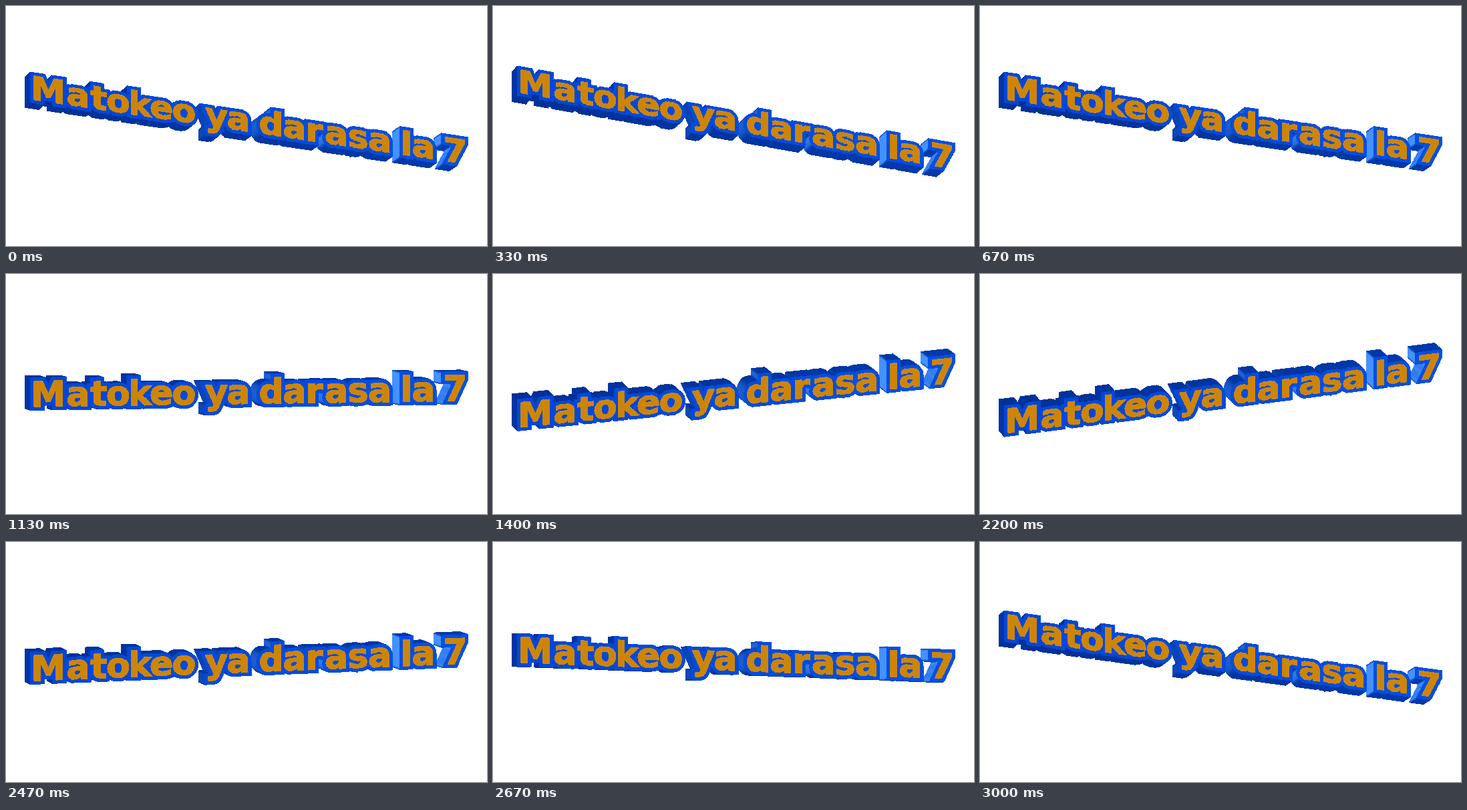
An HTML page with a canvas that plays this animation: 720 by 360 pixels, repeating every 3.07 s.

```html
<!DOCTYPE html>
<html lang="sw">
<head>
<meta charset="utf-8">
<title>Matokeo ya darasa la 7</title>
<style>
  html, body { margin: 0; width: 100%; height: 100%; overflow: hidden; background: #fff; }
  canvas { display: block; width: 720px; height: 360px; }
</style>
</head>
<body>
<canvas id="stage" width="720" height="360" role="img" aria-label="Matokeo ya darasa la 7"></canvas>
<script>
const W = 720, H = 360, LOOP = 3070, STEP = 200 / 3, LAST = 45;
const MID_X = 360, MID_Y = 175, CAP = 38, LAYERS = 16;
const SWING = 0.177, YAW = 0.41; // greatest slope, tangent of the turn to the side

const text = 'Matokeo ya darasa la 7'.replace(/ /g, '');
const centers = [63.5, 107.5, 138.5, 168, 203, 232.5, 266.5, 315, 347.5,
  396, 431.5, 463.5, 494, 527, 559, 599.5, 624.5, 672];

// step number and swing phase in degrees
const phases = [[1, -32.6], [10, 32.6], [17, 94.4], [25, 157], [33, 223.3], [40, 282.2], [45, 320.7]];

const ctx = document.getElementById('stage').getContext('2d');
const clamp = v => Math.max(0, Math.min(1, v));
const mix = (a, b, t) => a.map((v, i) => v + (b[i] - v) * t);
const pack = ([r, g, b]) => (255 << 24 | Math.round(b) << 16 | Math.round(g) << 8 | Math.round(r)) >>> 0;

// Flat lettering: blue is the rim, red is the face
function drawFlat() {
  const c = document.createElement('canvas');
  c.width = W;
  c.height = H;
  const g = c.getContext('2d', { willReadFrequently: true });
  g.font = `bold ${CAP / 0.729}px "DejaVu Sans", Inter, sans-serif`;
  g.miterLimit = 3;
  const layer = (color, width) => {
    g.fillStyle = g.strokeStyle = color;
    g.lineWidth = width;
    [...text].forEach((ch, i) => {
      const m = g.measureText(ch);
      const x = centers[i] - (m.actualBoundingBoxRight - m.actualBoundingBoxLeft) / 2;
      g.strokeText(ch, x, MID_Y + CAP / 2);
      g.fillText(ch, x, MID_Y + CAP / 2);
    });
  };
  layer('#00f', 12);
  layer('#f00', 1.6);
  return g.getImageData(0, 0, W, H).data;
}

// Every solid pixel with its front and side colour
function buildCells() {
  const flat = drawFlat();
  const solid = (x, y) => flat[(y * W + x) * 4 + 3] > 127;
  const cells = [];
  for (let y = 4; y < H - 4; y++) for (let x = 4; x < W - 4; x++) {
    if (!solid(x, y)) continue;
    let gx = 0, gy = 0;
    for (let v = -3; v <= 3; v++) for (let u = -3; u <= 3; u++) {
      if (!solid(x + u, y + v)) { gx += u; gy += v; }
    }
    const left = Math.max(0, -gx / (Math.hypot(gx, gy) || 1));
    const shade = mix([0, 48, 150], [0, 58, 172], x / W);
    const glow = mix([0, 52, 165], [68, 145, 255], clamp((x - 230) / 330));
    const face = flat[(y * W + x) * 4] > 127;
    cells.push({
      x, y,
      side: pack(mix(shade, glow, left ** 4)),
      front: pack(face ? [205, 133, 8] : mix([0, 70, 215], [0, 80, 230], x / W))
    });
  }
  return cells;
}

const cells = buildCells();
const picture = ctx.createImageData(W, H);
const pixels = new Uint32Array(picture.data.buffer);

function slopeAt(step) {
  const s = Math.max(1, step);
  const i = Math.max(1, phases.findIndex(p => p[0] >= s));
  const [a, pa] = phases[i - 1], [b, pb] = phases[i];
  return SWING * Math.cos((pa + (pb - pa) * (s - a) / (b - a)) * Math.PI / 180);
}

function draw(step) {
  const slope = slopeAt(step);
  const squash = Math.sqrt(1 - (slope / YAW) ** 2);
  const depth = 62 * slope - 1.7;
  pixels.fill(0xffffffff);
  for (let n = LAYERS; n >= 0; n--) {
    const z = n / LAYERS, key = n ? 'side' : 'front';
    for (const c of cells) {
      const x = c.x - Math.round(z * (8 + (c.x - 36) * 0.005));
      const y = Math.round(MID_Y + (c.y - MID_Y) * squash + slope * (c.x - MID_X - 32) + z * depth);
      pixels[y * W + x] = c[key];
    }
  }
  ctx.putImageData(picture, 0, 0);
}

const start = performance.now();
let shown = -1;
function tick() {
  const t = (performance.now() - start) % LOOP;
  const step = Math.min(LAST, Math.floor((t + 4) / STEP));
  if (step !== shown) draw(shown = step);
  requestAnimationFrame(tick);
}
tick();
</script>
</body>
</html>
```
